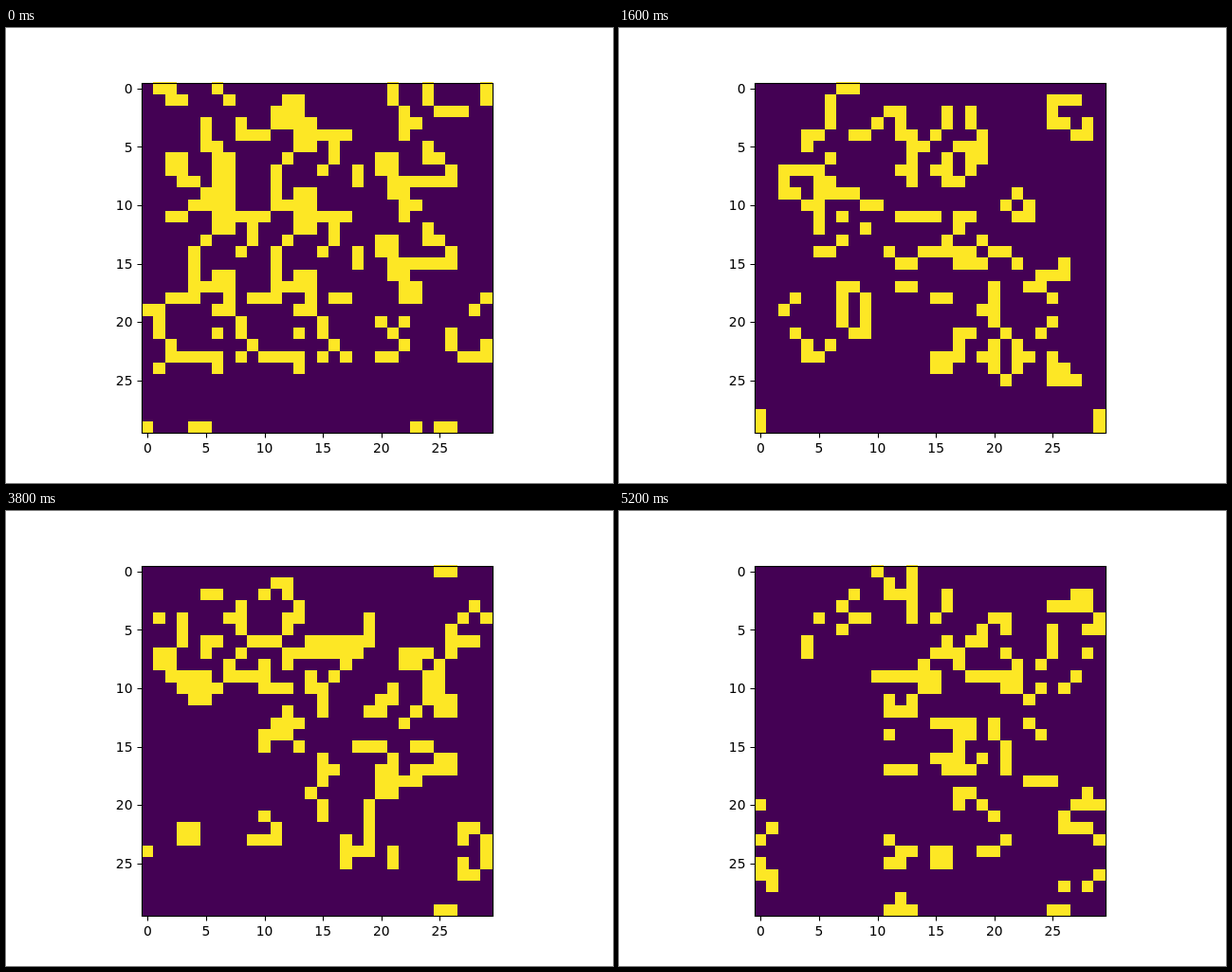
Recreate the animation shown at these times as an HTML page. Size 640x480 px, loop 5400 ms.

```html
<!DOCTYPE html>
<html lang="en">
<head>
<meta charset="utf-8">
<title>Game of Life</title>
<style>
  html, body { margin: 0; width: 100%; height: 100%; overflow: hidden; background: #fff; }
  svg { display: block; width: 640px; height: 480px; }
  text { font: 13.89px "DejaVu Sans", sans-serif; }
  .x text { text-anchor: middle; }
  .y text { text-anchor: end; }
  .line { fill: none; stroke: #000; stroke-width: 1.11; }
</style>
</head>
<body>
<svg viewBox="0 0 640 480">
  <rect x="143" y="58" width="370" height="369" fill="#440154"/>
  <path id="cells" fill="#fde725" shape-rendering="crispEdges"/>
  <rect class="line" x="143.5" y="58.5" width="370" height="369"/>
  <path id="ticks" class="line"/>
  <g id="xLabels" class="x"></g>
  <g id="yLabels" class="y"></g>
</svg>
<script>
const SIZE = 30, CELL = 12.32, STEP = 200, COUNT = 27;
const $ = id => document.getElementById(id);

// Shapes list the live columns of each row, rows parted by slashes.
const HOOK = '2-6/2-3 5/1 5/0 4/0/0 2-3/0-3';
const TAIL = '3 5-6/2-3/4/2 4/5/2 4 6/2';
const COMB = '6/2-3 6-7/0 2-3 8/0 3-8/3-4/4-5';

const emptyGrid = () => Array.from({ length: SIZE }, () => Array(SIZE).fill(0));

function stamp(grid, row, col, shape) {
  shape.split('/').forEach((spans, i) => {
    for (const span of spans.split(' ').filter(Boolean)) {
      const [from, to = from] = span.split('-').map(Number);
      for (let c = from; c <= to; c++) grid[row + i][col + c] = 1;
    }
  });
}

function startGrid() {
  const grid = emptyGrid();
  for (const [r, c] of [[4, 11], [11, 4], [11, 11]]) stamp(grid, r, c, HOOK);
  for (const c of [4, 11]) stamp(grid, 18, c, TAIL);
  for (const r of [5, 12]) stamp(grid, r, 18, COMB);
  stamp(grid, 0, 0, '1-2 6 21 24 29/2-3 7 12-13 21 24 29/11-13 22 25-27/5 8 11-14 22-23/' +
    '5 8-10 22/5-6/2-3 6-7/2-3 6-7/3-4 6-7/5-7/4-7/2-3 22');
  stamp(grid, 18, 0, '2-4 11 22-23 29/0-1 28/1 20 22/1 21 26/2 22 26 29/' +
    '2-5 10-12 20-21 27-29/1');
  stamp(grid, 29, 0, '0 4-5 23 25-26');
  return grid;
}

// One generation on a board whose edges wrap round.
function evolve(grid) {
  const wrap = n => (n + SIZE) % SIZE;
  return grid.map((line, r) => line.map((live, c) => {
    let sum = 0;
    for (let i = -1; i <= 1; i++)
      for (let j = -1; j <= 1; j++) sum += grid[wrap(r + i)][wrap(c + j)];
    return sum === 3 || (live && sum === 4) ? 1 : 0;
  }));
}

const edgeX = c => Math.round(143 + CELL * c);
const edgeY = r => Math.round(57.4 + CELL * r);

function toPath(grid) {
  let d = '';
  grid.forEach((line, r) => line.forEach((live, c) => {
    if (live) d += `M${edgeX(c)} ${edgeY(r)}H${edgeX(c + 1)}V${edgeY(r + 1)}H${edgeX(c)}Z`;
  }));
  return d;
}

function label(group, x, y, value) {
  const el = document.createElementNS('http://www.w3.org/2000/svg', 'text');
  el.setAttribute('x', x);
  el.setAttribute('y', y);
  el.textContent = value;
  group.append(el);
}

let ticks = '';
for (let n = 0; n < SIZE; n += 5) {
  const x = 143.2 + CELL * (n + 0.5), y = 57.6 + CELL * (n + 0.5);
  ticks += `M${Math.round(x) + 0.5} 427.5v5M143.5 ${Math.round(y) + 0.5}h-5`;
  label($('xLabels'), x, 448, n);
  label($('yLabels'), 133.5, Math.round(y + 5.28), n);
}
$('ticks').setAttribute('d', ticks);

const paths = [];
for (let grid = startGrid(); paths.length < COUNT; grid = evolve(grid)) paths.push(toPath(grid));

let shown = -1;
function draw() {
  const index = Math.floor(performance.now() / STEP) % COUNT;
  if (index !== shown) $('cells').setAttribute('d', paths[shown = index]);
  requestAnimationFrame(draw);
}
draw();
</script>
</body>
</html>
```
